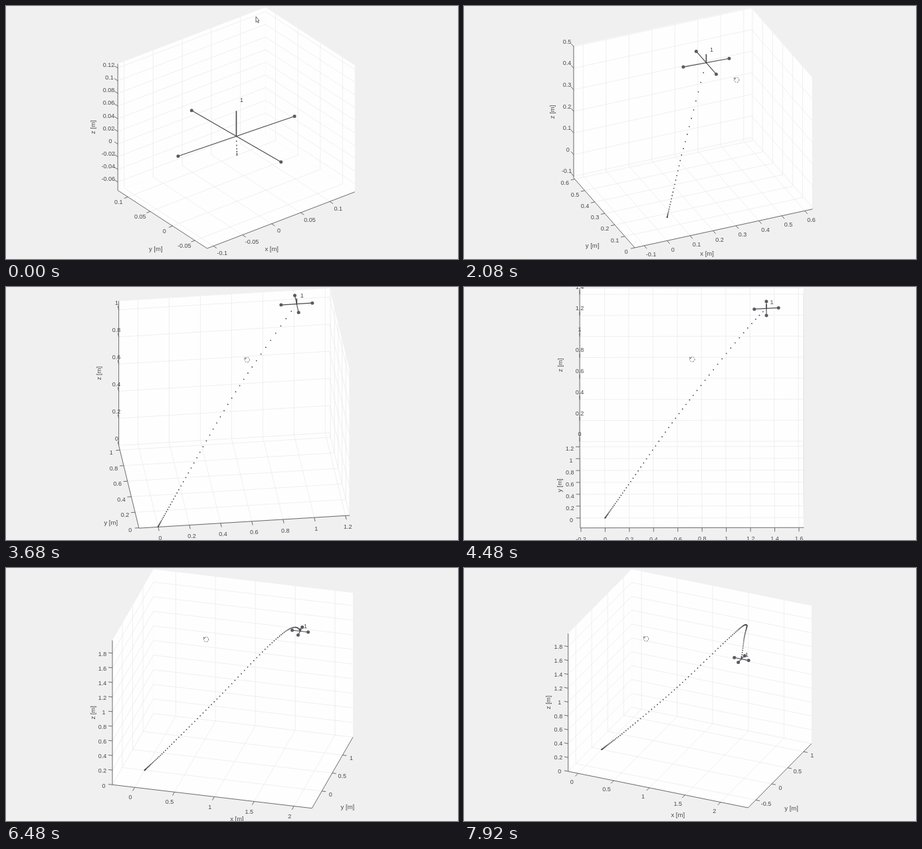
Write an HTML page with a canvas that moves like this. It is 680 by 382 pixels and loops after 8 s.

```html
<!DOCTYPE html>
<html lang="en">
<head>
<meta charset="utf-8">
<title>Flight path plot</title>
<style>
html, body { margin: 0; width: 100%; height: 100%; overflow: hidden; background: #f0f0f0; }
canvas { display: block; width: 680px; height: 382px; }
</style>
</head>
<body>
<canvas id="stage"></canvas>
<script>
const W = 680, H = 382, STEP = 0.08, FRAMES = 100;
const INK = '#48484c', AXIS = '#5c5c60', GRID = '#ebebeb';
const FONT = '"Liberation Sans", Arial, sans-serif';
const ARM = 0.1, MAST = 0.04;
const LEAD = 7;          // steps flown before the loop begins
const ASPECT = 0.788;    // box depth and height against its width
const GRAB = 0.7, DRAG = 1.35;

const canvas = document.getElementById('stage');
const ratio = window.devicePixelRatio || 1;
canvas.width = W * ratio;
canvas.height = H * ratio;
const ctx = canvas.getContext('2d');
ctx.scale(ratio, ratio);

// Way points: seconds since take-off, then x, y, z in metres.
const POINTS = [
  [0, 0, 0, 0],
  [1.76, 0.16, 0.223, 0.134],
  [3.52, 0.70, 0.80, 0.67],
  [5.04, 1.335, 1.02, 1.415],
  [6.32, 1.685, 0.755, 1.80],
  [7.76, 1.993, 0.005, 1.99],
  [8.48, 2.147, -0.414, 1.945]
];
const LAST = POINTS.length - 1, END = POINTS[LAST][0];

const clamp = u => Math.min(1, Math.max(0, u));
const ease = u => (u = clamp(u), u * u * (3 - 2 * u));

const span = i => POINTS[i + 1][0] - POINTS[i][0];
const slope = (i, c) => (POINTS[i + 1][c] - POINTS[i][c]) / span(i);
const speed = (i, c) => i === LAST ? slope(i - 1, c)
  : (slope(i - 1, c) * span(i) + slope(i, c) * span(i - 1)) / (span(i - 1) + span(i));

// Steady acceleration to the first way point, then a smooth curve.
function place(time) {
  let i = 0;
  while (i < LAST - 1 && time >= POINTS[i + 1][0]) i++;
  const a = POINTS[i], b = POINTS[i + 1], h = span(i), u = clamp((time - a[0]) / h);
  return [1, 2, 3].map(c => {
    if (i === 0) return b[c] * u * u;
    const e = ease(u), v = 1 - u;
    return a[c] * (1 - e) + b[c] * e + h * u * v * (v * speed(i, c) - u * speed(i + 1, c));
  });
}

// The craft leans into its acceleration.
function lean(time) {
  const d = 0.5, mid = Math.min(time, END - d);
  const before = place(mid - d), now = place(mid), after = place(mid + d);
  return now.map((p, c) => -0.35 * (before[c] - 2 * p + after[c]) / (d * d));
}

// Equal-unit limits around the trail and the craft.
function limits(trail, [x, y, z]) {
  const all = [...trail, [x - ARM, y - ARM, z], [x + ARM, y + ARM, z + MAST]];
  const lo = [0, 1, 2].map(c => Math.min(...all.map(p => p[c])));
  const hi = [0, 1, 2].map(c => Math.max(...all.map(p => p[c])));
  const shape = [1, ASPECT, ASPECT];
  const size = Math.max(...shape.map((k, c) => (hi[c] - lo[c]) / k));
  return shape.map((k, c) => {
    const mid = (lo[c] + hi[c]) / 2;
    return [mid - size * k / 2, mid + size * k / 2];
  });
}

function makeView(t, azimuth, [[x0, x1], [y0, y1], [z0, z1]]) {
  const rad = Math.PI / 180;
  const elevation = 30 - 3 * ease((t - 3.8) / 2.5);
  const ca = Math.cos(azimuth * rad), sa = Math.sin(azimuth * rad);
  const ce = Math.cos(elevation * rad), se = Math.sin(elevation * rad);
  const cx = 346.5 - 0.85 * t, top = 2, height = 364 - 0.5 * t;
  const s = height / ((x1 - x0) * Math.abs(sa) * se + (y1 - y0) * ca * se + (z1 - z0) * ce);
  const at = (x, y, z) => {
    x -= (x0 + x1) / 2; y -= (y0 + y1) / 2; z -= (z0 + z1) / 2;
    return [cx + s * (ca * x + sa * y), top + height / 2 + s * (sa * se * x - ca * se * y - ce * z)];
  };
  return { at, azimuth, x0, x1, y0, y1, z0, z1 };
}

function ticks(lo, hi, most) {
  const step = [0.01, 0.02, 0.05, 0.1, 0.2, 0.5, 1].find(n => (hi - lo) / n <= most);
  const out = [];
  for (let k = Math.ceil(lo / step - 1e-6); k * step <= hi + 1e-6; k++) out.push(+(k * step).toFixed(2));
  return out;
}

function line(points, color, width) {
  ctx.beginPath();
  points.forEach(p => ctx.lineTo(p[0], p[1]));
  ctx.strokeStyle = color;
  ctx.lineWidth = width;
  ctx.stroke();
}

function dot(p, r) {
  ctx.beginPath();
  ctx.arc(p[0], p[1], r, 0, 7);
  ctx.fill();
}

function unit(a, b) {
  const dx = b[0] - a[0], dy = b[1] - a[1], d = Math.hypot(dx, dy) || 1;
  return [dx / d, dy / d];
}

function label(text, x, y, size = 9, turned = false) {
  ctx.save();
  ctx.font = size + 'px ' + FONT;
  ctx.fillStyle = INK;
  ctx.textAlign = 'center';
  ctx.textBaseline = 'middle';
  ctx.translate(x, y);
  if (turned) ctx.rotate(-Math.PI / 2);
  ctx.fillText(text, 0, 0.5);
  ctx.restore();
}

// One ruler: its line, tick marks and numbers; returns the widest number.
function ruler(point, lo, hi, values, dir) {
  line([point(lo), point(hi)], AXIS, 0.9);
  let widest = 0;
  ctx.font = '9px ' + FONT;
  for (const v of values) {
    const p = point(v), text = String(v), w = ctx.measureText(text).width;
    widest = Math.max(widest, w);
    line([p, [p[0] + dir[0] * 6, p[1] + dir[1] * 6]], AXIS, 0.9);
    label(text, p[0] + dir[0] * (12 + w * 0.25), p[1] + dir[1] * 14 + 3);
  }
  return widest;
}

function drawAxes({ at, azimuth, x0, x1, y0, y1, z0, z1 }) {
  const left = azimuth < 0, side = left ? -1 : 1, turn = Math.abs(azimuth);
  const wallX = left ? x1 : x0, frontX = left ? x0 : x1, cornerY = left ? y1 : y0;

  ctx.fillStyle = '#fefefe';
  const faces = [
    [[x0, y0, z0], [x1, y0, z0], [x1, y1, z0], [x0, y1, z0]],
    [[x0, y1, z0], [x1, y1, z0], [x1, y1, z1], [x0, y1, z1]],
    [[wallX, y0, z0], [wallX, y1, z0], [wallX, y1, z1], [wallX, y0, z1]]
  ];
  for (const face of faces) {
    ctx.beginPath();
    face.forEach(c => ctx.lineTo(...at(...c)));
    ctx.fill();
  }

  const xs = ticks(x0, x1, 11.7), ys = ticks(y0, y1, 8), zs = ticks(z0, z1, 10.5);
  for (const x of xs) line([at(x, y0, z0), at(x, y1, z0), at(x, y1, z1)], GRID, 0.8);
  for (const y of ys) line([at(frontX, y, z0), at(wallX, y, z0), at(wallX, y, z1)], GRID, 0.8);
  for (const z of zs) line([at(wallX, y0, z), at(wallX, y1, z), at(frontX, y1, z)], GRID, 0.8);

  const o = at(x0, y0, z0), back = at(x0, y1, z0), right = at(x1, y0, z0);
  const outX = unit(back, o);
  const outY = left ? unit(right, o) : unit(o, right);
  const outZ = left ? unit(o, back) : unit(right, o);
  ruler(x => at(x, y0, z0), x0, x1, xs, outX);
  ruler(y => at(frontX, y, z0), y0, y1, ys, outY);
  const wide = ruler(z => at(x0, cornerY, z), z0, z1, zs, outZ);

  const mx = at((x0 + x1) / 2, y0, z0);
  const my = at(frontX, (y0 + y1) / 2, z0);
  const mz = at(x0, cornerY, (z0 + z1) / 2);
  const flat = turn < 5;
  label('x [m]', mx[0] + side * (44 - 0.8 * turn) + (left ? 0 : 5), mx[1] + 28 + 0.42 * turn, 9.5);
  label('y [m]', my[0] + side * (31 - 0.56 * turn), my[1] + (flat ? 1 : 56 - 0.29 * turn), 9.5, flat);
  label('z [m]', mz[0] - 17 - wide, mz[1], 9.5, true);
}

function drawFlight(at, trail, [x, y, z], [tx, ty]) {
  ctx.fillStyle = '#48484f';
  trail.forEach(p => dot(at(...p), 0.9));
  const ends = [
    at(x - ARM, y, z - ARM * tx), at(x + ARM, y, z + ARM * tx),
    at(x, y - ARM, z - ARM * ty), at(x, y + ARM, z + ARM * ty)
  ];
  line([ends[0], ends[1]], INK, 1.1);
  line([ends[2], ends[3]], INK, 1.1);
  line([at(x, y, z), at(x, y, z + MAST)], INK, 1.6);
  ctx.fillStyle = '#5a5b62';
  ends.forEach(p => dot(p, 2.5));
  const tag = at(x, y, z + 0.056);
  label('1', tag[0] + 8, tag[1] - 1);
}

function drawArrow() {
  ctx.beginPath();
  [[0, 0], [0, 8.5], [1.9, 6.8], [3.2, 9.4], [4.4, 8.8], [3.2, 6.2], [5, 6]].forEach(p => ctx.lineTo(...p));
  ctx.closePath();
  ctx.fillStyle = '#fff';
  ctx.fill();
  ctx.strokeStyle = '#555';
  ctx.lineWidth = 0.9;
  ctx.stroke();
}

function drawTurner() {
  ctx.fillStyle = '#fff';
  dot([0, 0], 4.6);
  ctx.setLineDash([2.6, 1.2]);
  ctx.beginPath();
  ctx.arc(0, 0, 3.7, -2.4, 3.3);
  ctx.strokeStyle = '#666';
  ctx.lineWidth = 0.9;
  ctx.stroke();
  ctx.setLineDash([]);
  line([[-4, -3.6], [-3.4, -1.4], [-1.2, -2]], '#555', 0.9);
}

function drawPointer(t, drag) {
  const u = ease(t / GRAB);
  ctx.save();
  ctx.translate(376 + 74 * u - drag, 16 + 97 * u - 0.035 * drag);
  if (t < GRAB) drawArrow();
  else drawTurner();
  ctx.restore();
}

function draw(now) {
  const frame = Math.floor(now / 1000 / STEP) % FRAMES, t = frame * STEP;
  const trail = Array.from({ length: frame + LEAD + 1 }, (_, k) => place(k * STEP));
  const craft = trail[trail.length - 1];
  // The pulled distance turns the box.
  const drag = 49.3 * Math.max(0, t - DRAG) ** 0.676;
  const view = makeView(t, -37.5 + 0.35 * drag, limits(trail, craft));
  ctx.fillStyle = '#f0f0f0';
  ctx.fillRect(0, 0, W, H);
  drawAxes(view);
  drawFlight(view.at, trail, craft, lean(t + LEAD * STEP));
  drawPointer(t, drag);
}

const start = performance.now();
function loop() {
  draw(performance.now() - start);
  requestAnimationFrame(loop);
}
loop();
</script>
</body>
</html>
```
